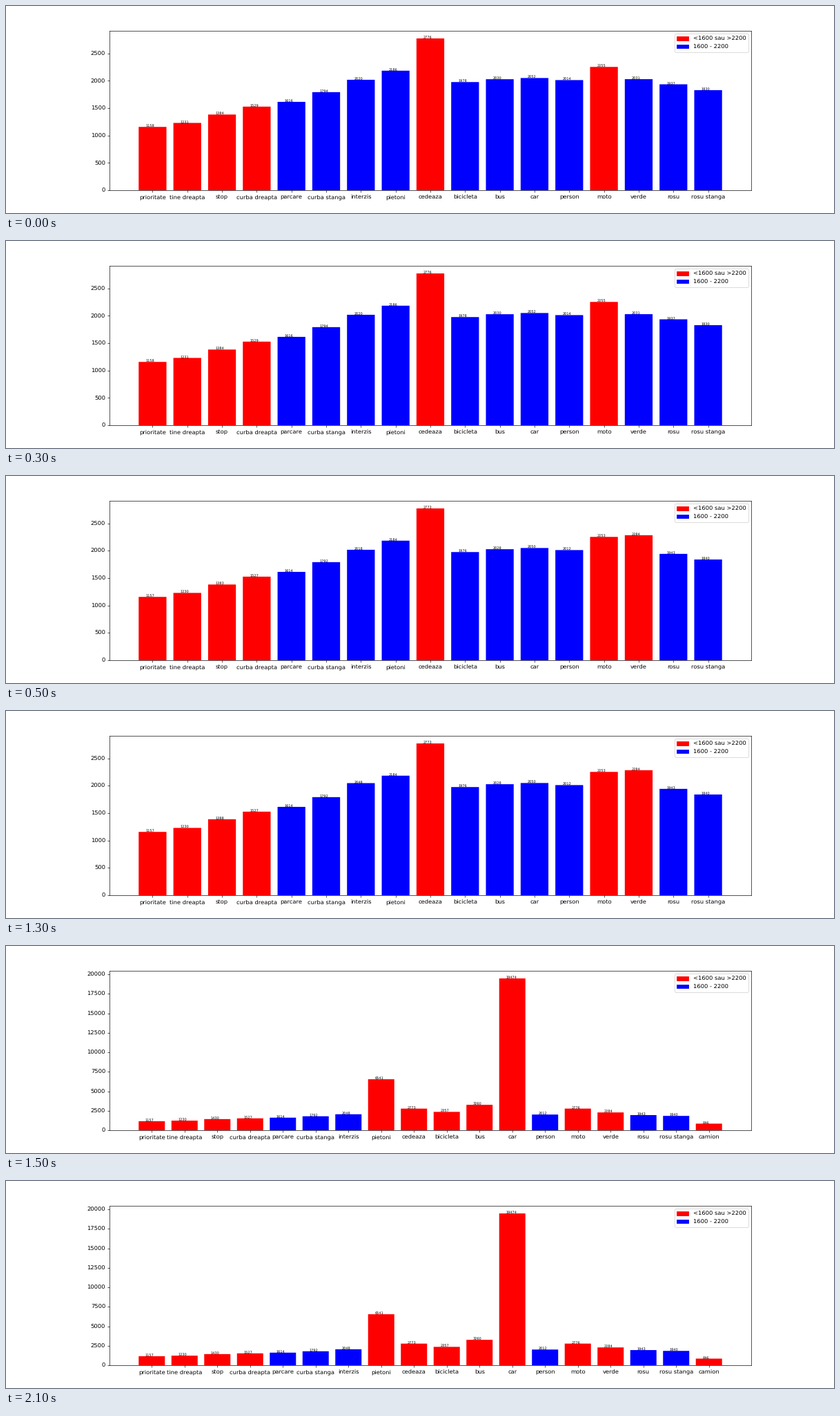
Recreate the animation shown at these times as a matplotlib script. Size 1200x300 px, loop 2.5 s.

```python
import matplotlib.pyplot as plt
from matplotlib.animation import FuncAnimation
from matplotlib.patches import Patch

LOW, HIGH = 1600, 2200
TRIM = 1.001  # share of samples dropped by the first clean-up

cleaned = {
    "prioritate": 1157, "tine dreapta": 1230, "stop": 1383,
    "curba dreapta": 1527, "parcare": 1614, "curba stanga": 1792,
    "interzis": 2018, "pietoni": 2184, "cedeaza": 2773, "bicicleta": 1976,
    "bus": 2028, "car": 2050, "person": 2012, "moto": 2253,
    "verde": 2284, "rosu": 1943, "rosu stanga": 1840,
}
raw = {name: round(count * TRIM) for name, count in cleaned.items()}
raw |= {"verde": 2031, "rosu": 1937, "rosu stanga": 1830}
extended = cleaned | {"stop": 1388, "interzis": 2048}
merged = extended | {
    "stop": 1430, "pietoni": 6541, "bicicleta": 2357, "bus": 3260,
    "car": 19474, "moto": 2776, "camion": 846,
}
STEPS = [raw, cleaned, extended, merged, merged]  # the last chart is held

plt.rcParams.update({"font.family": "DejaVu Sans", "text.hinting": "none"})
fig, ax = plt.subplots(figsize=(20, 5), dpi=60)


def bar_color(count):
    return "blue" if LOW <= count <= HIGH else "red"


def draw(step):
    counts = STEPS[step]
    ax.clear()
    ax.bar(list(counts), list(counts.values()), snap=False,
           color=[bar_color(count) for count in counts.values()])
    for i, count in enumerate(counts.values()):
        ax.text(i - 0.2, count, str(count), fontsize=6)
    ax.legend(loc="upper right", handles=[
        Patch(color="red", label=f"<{LOW} sau >{HIGH}"),
        Patch(color="blue", label=f"{LOW} - {HIGH}"),
    ])
    return []


anim = FuncAnimation(fig, draw, frames=len(STEPS), interval=500,
                     init_func=lambda: [], repeat=True, repeat_delay=0)
plt.show()
```
